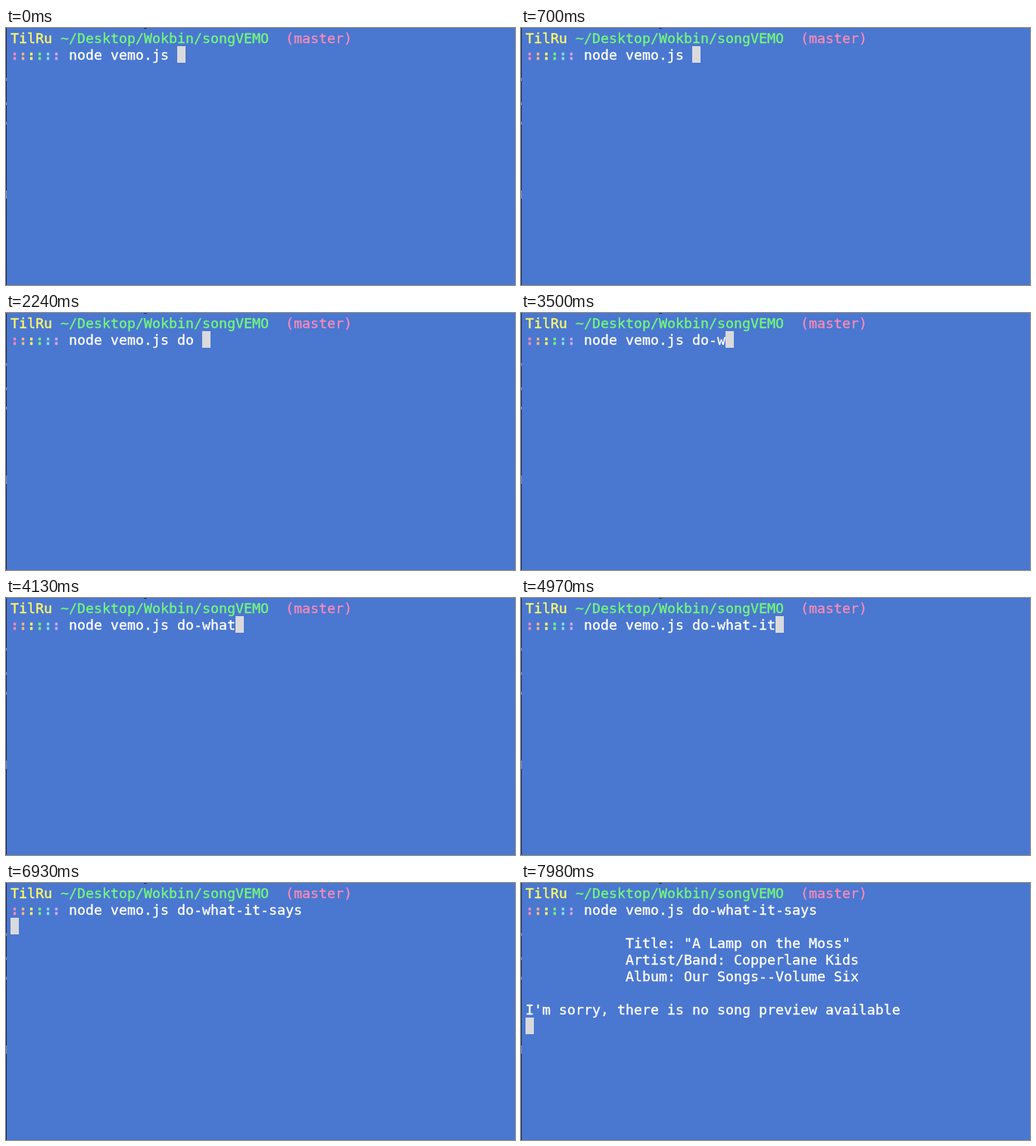
An HTML page with a canvas for the animation above (8000 ms loop, 672x340 px).

```html
<!DOCTYPE html>
<html lang="en">
<head>
<meta charset="utf-8">
<title>Terminal session</title>
<style>
  html, body { margin: 0; width: 100%; height: 100%; overflow: hidden; background: #4a77d0; }
  canvas { display: block; }
</style>
</head>
<body>
<canvas id="screen" width="672" height="340"></canvas>
<script>
const ctx = document.getElementById("screen").getContext("2d");
const LOOP = 8000, CELL_W = 11, CELL_H = 22, LEFT = 6, TOP = 2;
const COLORS = {
  back: "#4a77d0", text: "#ffffff", cursor: "#d9dadd", edge: "#1d2a48", mark: "#7f8898",
  yellow: "#fdfa6a", green: "#72f97c", pink: "#f78bb8"
};
const PROMPT = ["#f78bb8", "#f5b883", "#fdfa6a", "#72f97c", "#86dcf5", "#d3a5f5"];
const COMMAND = "node vemo.js ";
const ENTER_AT = 6650, OUTPUT_AT = 7700;

// [time, key]; "<" is backspace
const KEYS = [
  [840, "d"], [1120, "o"], [1610, " "], [2590, "<"], [2940, "-"], [3360, "w"],
  [3710, "h"], [3920, "a"], [4130, "t"], [4410, "-"], [4620, "i"], [4830, "t"],
  [5180, "-"], [5460, "s"], [5670, "a"], [5880, "y"], [6090, "s"]
];

const OUTPUT = [
  [3, 12, 'Title: "A Lamp on the Moss"'],
  [4, 12, "Artist/Band: Copperlane Kids"],
  [5, 12, "Album: Our Songs--Volume Six"],
  [7, 0, "I'm sorry, there is no song preview available"]
];

function typedText(time) {
  return KEYS.filter(([at]) => at <= time)
    .reduce((text, [, key]) => key === "<" ? text.slice(0, -1) : text + key, "");
}

// A hairline stroke gives the slightly heavy terminal lettering.
function print(row, col, text, color = COLORS.text, weight = "normal") {
  const x = LEFT + col * CELL_W, y = TOP + row * CELL_H + 18;
  ctx.font = `${weight} 18.27px "DejaVu Sans Mono", monospace`;
  ctx.fillStyle = ctx.strokeStyle = color;
  ctx.lineWidth = 0.35;
  ctx.lineJoin = "round";
  ctx.fillText(text, x, y);
  ctx.strokeText(text, x, y);
}

function rect(x, y, w, h, color) {
  ctx.fillStyle = color;
  ctx.fillRect(x, y, w, h);
}

function drawCursor(row, col) {
  rect(LEFT + col * CELL_W, TOP + row * CELL_H, CELL_W, CELL_H, COLORS.cursor);
}

function drawWindow() {
  rect(0, 0, 672, 340, COLORS.back);
  rect(0, 0, 1, 340, COLORS.edge);
  for (const y of [66, 98, 124]) rect(0, y, 1, 4, COLORS.mark);
  rect(0, 215, 1, 11, COLORS.mark);
  rect(182, 0, 4, 1, COLORS.edge);
}

function draw(time) {
  drawWindow();
  print(0, 0, "TilRu", COLORS.yellow);
  print(0, 6, "~/Desktop/Wokbin/songVEMO", COLORS.green);
  print(0, 33, "(master)", COLORS.pink);
  PROMPT.forEach((color, col) => print(1, col, ":", color, "bold"));

  const line = COMMAND + typedText(time);
  print(1, 7, line);

  if (time >= OUTPUT_AT) {
    OUTPUT.forEach(([row, col, text]) => print(row, col, text));
    drawCursor(8, 0);
  } else if (time >= ENTER_AT) {
    drawCursor(2, 0);
  } else {
    drawCursor(1, 7 + line.length);
  }
}

const start = performance.now();
function frame() {
  draw((performance.now() - start) % LOOP);
  requestAnimationFrame(frame);
}
frame();
</script>
</body>
</html>
```
